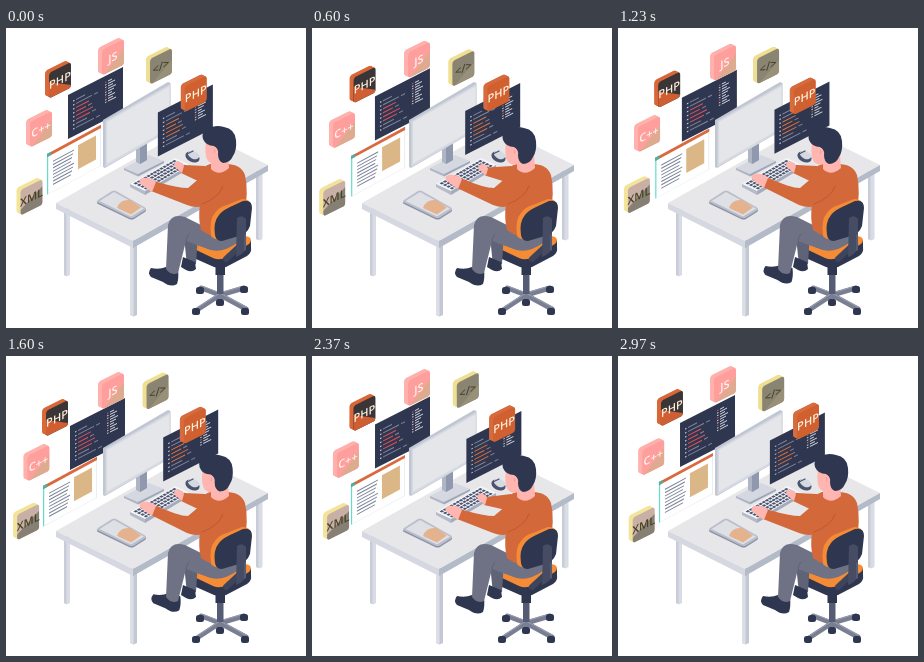
Recreate the animation shown at these times as an HTML page with a canvas. Size 300 by 300 pixels, loop 3010 ms.

```html
<!DOCTYPE html>
<html lang="en">
<head>
<meta charset="utf-8">
<title>Developer at a desk</title>
<style>
html, body { margin: 0; width: 100%; height: 100%; overflow: hidden; background: #fff; }
canvas { display: block; width: 300px; height: 300px; }
</style>
</head>
<body>
<canvas id="stage"></canvas>
<script>
const LOOP = 3010;
const canvas = document.getElementById('stage');
const dpr = window.devicePixelRatio || 1;
canvas.width = canvas.height = 300 * dpr;
const ctx = canvas.getContext('2d');

const NAVY = '#2f3750', SHIRT = '#d3693b', ORANGE = '#f58c35', SKIN = '#ffb5b0';
const TROUSER = '#6f7284', STEEL = '#797e92';

function shape(d, fill, stroke, width = 1) {
  const p = new Path2D(d);
  if (fill) { ctx.fillStyle = fill; ctx.fill(p); }
  if (stroke) {
    ctx.strokeStyle = stroke;
    ctx.lineWidth = width;
    ctx.lineJoin = ctx.lineCap = 'round';
    ctx.stroke(p);
  }
}

function oval(x, y, rx, ry, color, turn = 0) {
  ctx.beginPath();
  ctx.ellipse(x, y, rx, ry, turn, 0, 7);
  ctx.fillStyle = color;
  ctx.fill();
}

function rect(x, y, w, h, color) {
  ctx.fillStyle = color;
  ctx.fillRect(x, y, w, h);
}

function at(x, y, slope, draw) {
  ctx.save();
  ctx.transform(1, slope, 0, 1, x, y);
  draw();
  ctx.restore();
}

// Cosine wave that peaks at the given phase of the loop.
const wave = (p, mid, amp, peak) => mid + amp * Math.cos((p - peak) * 2 * Math.PI);
const drift = p => Math.pow(Math.sin(p * Math.PI), 1.4);

// Eased value through [time, value] stops.
function keyed(t, stops) {
  for (let i = 1; i < stops.length; i++) {
    const [t0, a] = stops[i - 1], [t1, b] = stops[i];
    if (t <= t1) {
      const k = (t - t0) / (t1 - t0);
      return a + (b - a) * k * k * (3 - 2 * k);
    }
  }
  return stops[stops.length - 1][1];
}

// low: colour below a line running from height a (left) to b (right).
function tile(x, y, label, { face, side, ink, size = 11, low, a, b }) {
  const block = (dx, dy, color) => at(x + 4 + dx, y + 12 + dy, -0.5, () => {
    ctx.beginPath();
    ctx.roundRect(0, 0, 22, 25.5, 3);
    ctx.fillStyle = color;
    ctx.fill();
  });
  for (let i = 8; i > 0; i--) block(-i / 2, -i / 4, side);
  block(0, 0, face);
  at(x + 4, y + 12, -0.5, () => {
    if (low) {
      ctx.save();
      ctx.beginPath();
      ctx.roundRect(0, 0, 22, 25.5, 3);
      ctx.clip();
      shape(`M0 ${a}L22 ${b}V26H0z`, low);
      ctx.restore();
    }
    ctx.fillStyle = ink;
    ctx.font = `600 ${size}px "Open Sans", sans-serif`;
    ctx.textAlign = 'center';
    ctx.textBaseline = 'middle';
    ctx.fillText(label, 11, 13.8);
  });
}

function codePanel(x, y, accent) {
  at(x, y, -0.51, () => {
    rect(0, 0, 55, 44, NAVY);
    for (let i = 0; i < 8; i++) {
      const v = 8 + i * 4, long = 9 + (i * 7) % 10;
      rect(5, v, 1.5, 1.2, '#c9ccd8');
      rect(8, v, long, 1.1, i > 1 && i < 6 ? accent : '#80859a');
      if (i % 2) rect(10 + long, v, 4, 1.1, '#80859a');
    }
    for (let i = 0; i < 9; i++) {
      const v = 6 + i * 2.5;
      rect(37, v, 1.5, 1, i % 3 ? '#d5d7e0' : accent);
      rect(40, v, 4 + (i * 3) % 5, 1, '#d5d7e0');
    }
  });
}

function docPanel(x, y) {
  at(x, y, -0.54, () => {
    rect(0, 0, 54, 41, '#fff');
    rect(0, 0, 1.2, 41, '#63dccb');
    rect(53.2, 0, 0.8, 41, '#e6e9ee');
    rect(0, 40.4, 54, 0.6, '#e9ebef');
    rect(0, 0, 54, 3.2, '#d9693f');
    rect(0, 0, 4, 3.2, '#45b5a8');
    rect(31, 8, 18, 24, '#dbb787');
    for (let i = 0; i < 8; i++) rect(6, 10 + i * 3.3, 21 - (i * 5) % 4, 1.1, '#7b8498');
  });
}

function desk() {
  shape('M58 180h6v67l-3 1.5-3-1.5z', '#d9dce4');
  shape('M58 180h2.5v68l-2.5-1z', '#c8ccd7');
  shape('M250 143h6.5v68l-3 1.5-3.5-1.5z', '#d9dce4');
  shape('M250 143h2.5v69l-2.5-1z', '#c8ccd7');
  shape('M124 212h7v75l-3.5 1.5-3.5-1.5z', '#c3c8d4');
  shape('M124 212h3.5v76.5l-3.5-1.5z', '#dcdfe6');
  shape('M50 175L185 99 262 137 127 213z', '#e7e7ea');
  shape('M50 175L127 213V220L50 181z', '#d5d8e0');
  shape('M127 213L262 137V143L127 220z', '#b3bac8');
}

function monitor() {
  shape('M118 140L143 127 158 133 132 146z', '#d5d8e0');
  shape('M118 140L132 146V148.500L118 142z', '#aeb5c4');
  shape('M132 146L158 133V135L132 148.500z', '#9fa7b8');
  shape('M130 118L141 112V132L134 136 130 134z', '#aeb5c4');
  shape('M134 117L141 113V132L134 136z', '#8f98ad');
  shape('M97 92L162 54 164.500 55V102L99 140 97 139z', '#c0c6d2');
  shape('M99.500 93L164.500 56V102L99.500 139z', '#d6d9e1');
  shape('M101 94L163.500 58.500V100L101 135.500z', '#e5e6ea');
}

function keyboard() {
  shape('M124 156L169 130 184 137 139 163z', '#f5f6f9');
  shape('M124 156L139 163V167L124 159z', '#b5bbc9');
  shape('M139 163L184 137V140L139 167z', '#a4abbc');
  for (let r = 0; r < 4; r++)
    for (let c = 0; c < 13; c++) {
      const x = 127.5 + r * 3.4 + c * 3.2, y = 155.5 + r * 1.6 - c * 1.85;
      shape(`M${x} ${y}l2.400-1.400 2.300 1.100-2.400 1.400z`, '#4d5570');
    }
}

function deskItems() {
  shape('M92 173.5Q90 175 92 176L123 191Q126 192 128 191L139 184Q141 182.5 139 180.5L110 164Q108 163 106 164z', '#8b92a6');
  shape('M92 172Q90 173.500 92 174.500L123 189.500Q126 190.500 128 189.500L139 182.500Q141 181 139 179.500L110 163Q108 162 106 163z', '#b9becb');
  shape('M93.500 173L108 164 138 180.500 125 188.500z', '#dfe0e6');
  shape('M111 180Q114 171 124 172L135 179.500 125 186.500z', '#e4b28d');
  oval(186.500, 129, 7.5, 5, '#4a536d', 0.45);
  oval(187.500, 127, 6, 3.8, '#d5d9e2', 0.45);
  shape('M182 125.500l5-2.500', null, '#4a536d', 1.2);
}

function legs(foot) {
  // Far leg, tucked under the seat
  shape('M178 208L192 205 190 236 181 238z', '#5f6377');
  shape('M177 229L189 234 190 241Q186 245 180 242L175 239z', NAVY);
  // Near leg
  ctx.save();
  ctx.translate(foot * 2.5, -foot * 2);
  shape('M160 239L172 242Q173 250 171 256Q165 260 157 254L145 249Q141 245 145 240Q153 242 160 239z', NAVY);
  ctx.restore();
  shape('M226 204L195 197 179 189Q165 185 162 197L160 241Q165 248 172 245L180 213 205 222Q225 222 226 204z', TROUSER);
  shape('M180 213Q181 205 188 203', null, '#5f6377', 1);
}

function chairBase() {
  shape('M214 267L191 282M214 267L195 260M214 267L238 260M214 267L240 281M214 267V272', null, STEEL, 5);
  shape('M214 265L191 280M214 265L196 258M214 265L238 258M214 265L240 279', null, '#9aa0b0', 1);
  for (const [x, y] of [[190, 283], [194, 262], [238, 261], [239, 283], [214, 274]]) {
    ctx.beginPath();
    ctx.roundRect(x - 4, y - 3, 8, 7, 2.5);
    ctx.fillStyle = NAVY;
    ctx.fill();
  }
  rect(211, 236, 6.5, 30, '#565c73');
  rect(209.5, 232, 9.5, 15, NAVY);
}

function chairSeat() {
  shape('M183 217V224Q184 229 190 231L208 239Q214 241 220 239L241 228Q246 225 245 219V212z', NAVY);
  shape('M183 216Q182 213 190 210L215 201 243 209Q247 212 243 216L221 229Q214 233 207 230L186 220z', ORANGE);
}

function hips() {
  shape('M188 199L234 196Q241 208 231 215Q217 225 205 222L186 215Q179 208 188 199z', TROUSER);
}

function torso({ lx, ly, rx, ry }) {
  // Far arm
  shape(`M${rx + 3} ${ry}L199 138 205 153 194 154 ${rx} ${ry + 8}Q${rx - 1} ${ry + 3} ${rx + 3} ${ry}z`, SHIRT);
  shape(`M${rx + 3} ${ry + 1}q-3-6-8-4q-4 3 0 6l6 5z`, SKIN);
  // Back and near arm
  shape('M197 140Q205 133 220 136Q235 136 239 147Q243 165 238 186Q237 204 224 210Q207 211 195 202Q192 191 194 175z', SHIRT);
  shape(`M${lx + 13} ${ly}Q172 160 182 160L195 149Q207 138 217 149Q220 161 206 174Q194 182 181 177L${lx + 7} ${ly + 9}Q${lx + 6} ${ly + 2} ${lx + 13} ${ly}z`, SHIRT);
  shape('M196 176Q213 170 217 158', null, '#bd592f', 1);
  shape(`M${lx + 12} ${ly}q-5-5-13-4q-5 1-3 5l6 5 6 4z`, SKIN);
}

function head(turn) {
  ctx.save();
  ctx.translate(6 * (1 - turn), turn - 1);
  shape('M194 114Q192 128 196 134Q200 138 206 136L216 130 210 112z', SKIN);
  ctx.restore();
  shape('M205 129L222 127 223 140Q213 149 205 141z', SKIN);
  ctx.save();
  ctx.translate(6 * (1 - turn), turn - 1);
  shape('M191 112Q189 105 195 102Q203 97 212 100Q223 102 224 113Q225 123 221 129Q218 136 211 136Q206 134 206 127Q207 122 202 119Q194 119 191 112z', NAVY);
  oval(202.5, 124, 2.7, 4, SKIN, -0.2);
  shape('M202.500 122.500q1 1 0 3', null, '#ea938f', 0.8);
  ctx.restore();
}

function chairBack() {
  shape('M205 208Q203 191 209 185Q213 179 221 177L236 171Q243 170 245 177L242 183 219 211Q209 213 205 208z', ORANGE);
  shape('M209 207Q207 194 213 187Q217 182 224 179L237 173Q246 171 246 180L244 198Q241 206 233 208L216 213Q210 213 209 207z', NAVY);
  shape('M234 192V218L220 231', null, '#3d445b', 6);
  shape('M231 190Q236 186 240 191V221Q236 227 230 229z', '#454c63');
  shape('M239 207V222', null, '#5a6178', 1.5);
}

const PINK = { face: '#ff9f9d', side: '#ffb1ac', ink: '#fff3ea', low: '#dfab90', a: 27, b: 9 };
const DARK_PHP = { face: '#3a3536', side: '#d9683a', ink: '#fff0dd', low: '#cf5f33', a: 9, b: 23 };
const RED_PHP = { face: '#d0602f', side: '#d76c3f', ink: '#fff0dd' };
const TAG = { face: '#8a8473', side: '#efdf93', ink: '#484229', low: '#999079', a: 27, b: 12 };
const XML = { face: '#c9b0a7', side: '#f3e49a', ink: '#4a4225', low: '#868074', a: 20, b: 7 };

function render(t) {
  const p = t / LOOP, d = drift(p);
  const turn = keyed(t, [[0, 0], [340, 1], [1430, 1], [1800, 0], [2030, 0], [2330, 1], [2650, 1], [2950, 0]]);
  const up = keyed(t, [[0, 0], [350, 0.2], [750, 1], [2000, 1], [2320, 0]]);
  const tap = keyed(t, [[0, 0], [350, 1], [480, 1], [780, 0], [2000, 0], [2330, 1], [2480, 1], [2850, 0]]);
  const foot = keyed(t, [[0, 0], [900, 0], [1220, 1], [1550, 1], [1880, 0]]);

  ctx.setTransform(dpr, 0, 0, dpr, 0, 0);
  rect(0, 0, 300, 300, '#fff');

  codePanel(62 + 2 * d, 67 + 3 * d, '#e0525a');
  desk();
  docPanel(41 - 4 * d, 126 + 4 * d);
  monitor();
  codePanel(152 + wave(p, 2.5, 2.7, 0.53), 84.5 - 3 * d, '#d9713f');
  keyboard();
  deskItems();

  tile(39 - 3 * d, 33 + 10 * d, 'PHP', DARK_PHP);
  tile(92, 10 + 6 * d, 'JS', PINK);
  tile(wave(p, 18.5, 2.6, 0.85), wave(p, 85, 3.1, 0.55), 'C++', PINK);
  tile(wave(p, 138, 3.1, 0.86), wave(p, 18, 3.2, 0.2), '</>', TAG);
  tile(wave(p, 8.6, 2.8, 0.87), wave(p, 148.5, 2.5, 0.15), 'XML', XML);
  tile(wave(p, 174, 3.1, 0.79), wave(p, 48.5, 2.5, 0.59), 'PHP', RED_PHP);

  chairBase();
  chairSeat();
  legs(foot);
  hips();
  torso({ lx: 138, ly: 154 - 4 * up, rx: 175 - 3 * tap, ry: 137 + 4 * tap });
  head(turn);
  chairBack();
}

const start = performance.now();
function tick() {
  render((performance.now() - start) % LOOP);
  requestAnimationFrame(tick);
}
tick();
</script>
</body>
</html>
```
